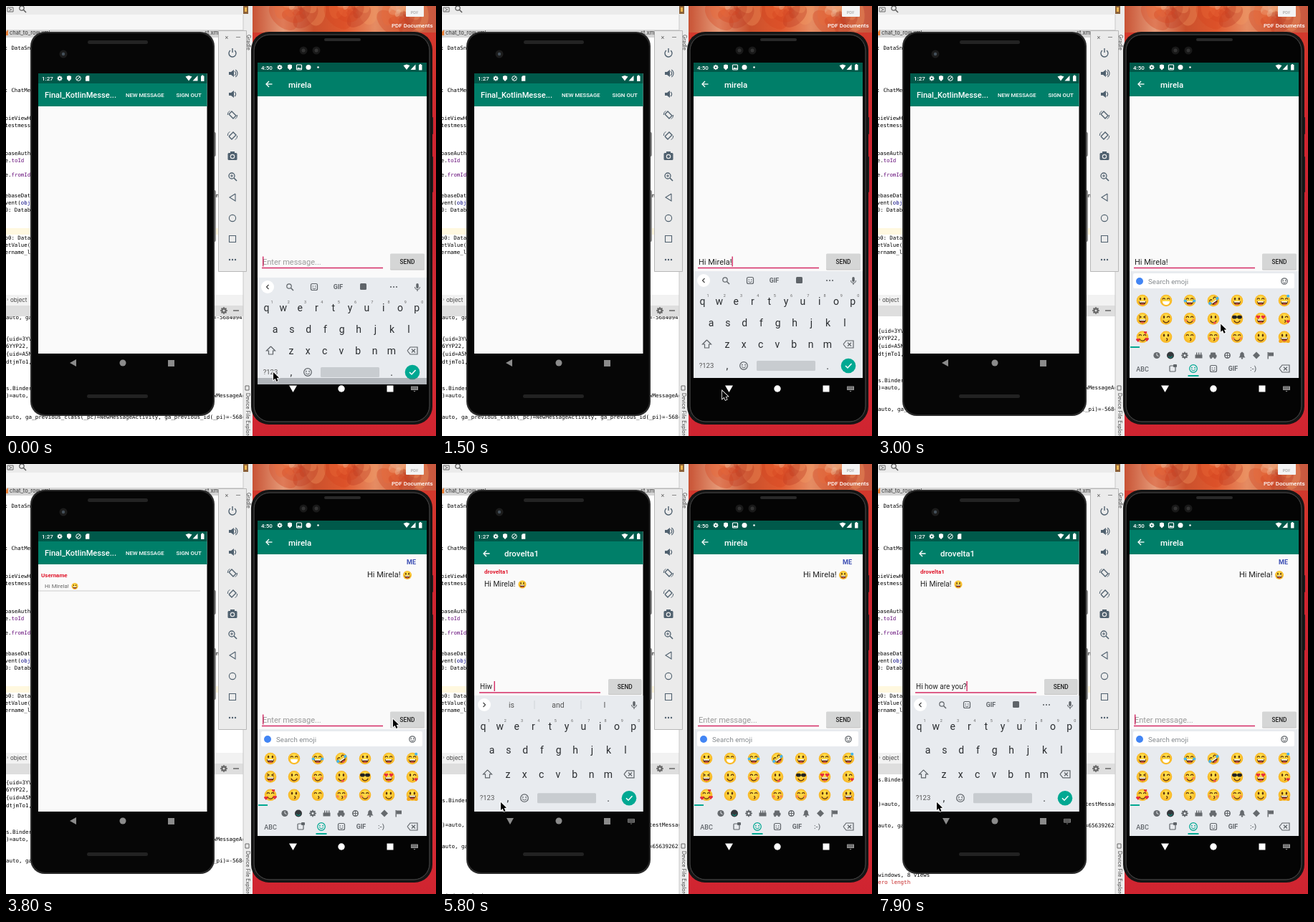
Write an HTML page with a canvas that moves like this. It is 600 px wide and 600 px high and loops after 8 s.

```html
<!DOCTYPE html>
<html lang="en">
<head>
<meta charset="utf-8">
<title>Messenger demo</title>
<style>
html, body { margin: 0; width: 100%; height: 100%; overflow: hidden; background: #fff; }
canvas { display: block; width: 600px; height: 600px; }
</style>
</head>
<body>
<canvas id="stage" width="600" height="600"></canvas>
<script>
const c = document.getElementById('stage').getContext('2d');
const LOOP = 8000, TAU = Math.PI * 2;
const SANS = 'Roboto, sans-serif', MONO = '"DejaVu Sans Mono", monospace';
const BAR = '#007f69', DARK = '#00594a', PINK = '#d32a63', TEAL = '#00a892';
const PAGE = '#fafafa', KEYS = '#e8ebef', ICON = '#5f6469', TOOL = '#50616f';
const PEER = 'mirela', ME = 'drovelta1', HELLO = 'Hi Mirela!';

// ---- drawing helpers ----
function box(x, y, w, h, fill, r = 0) {
  c.fillStyle = fill;
  c.beginPath();
  c.roundRect(x, y, w, h, r);
  c.fill();
}
function frame(x, y, w, h, color, lw = 1, r = 0) {
  c.strokeStyle = color;
  c.lineWidth = lw;
  c.beginPath();
  c.roundRect(x, y, w, h, r);
  c.stroke();
}
function dot(x, y, r, fill) {
  c.fillStyle = fill;
  c.beginPath();
  c.arc(x, y, r, 0, TAU);
  c.fill();
}
function ring(x, y, r, color, lw = 1, a = 0, b = TAU) {
  c.strokeStyle = color;
  c.lineWidth = lw;
  c.beginPath();
  c.arc(x, y, r, a, b);
  c.stroke();
}
function path(p, x = 0, y = 0) {
  c.beginPath();
  for (let i = 0; i < p.length; i += 2) c.lineTo(x + p[i], y + p[i + 1]);
}
function poly(p, fill, x, y) {
  path(p, x, y);
  c.fillStyle = fill;
  c.fill();
}
function line(p, color, lw = 1, x = 0, y = 0) {
  path(p, x, y);
  c.strokeStyle = color;
  c.lineWidth = lw;
  c.stroke();
}
function text(s, x, y, size, color, weight = 400, align = 'left', family = SANS) {
  c.font = `${weight} ${size}px ${family}`;
  c.fillStyle = color;
  c.textAlign = align;
  c.fillText(s, x, y);
}
function clipped(x, y, w, h, draw) {
  c.save();
  c.beginPath();
  c.rect(x, y, w, h);
  c.clip();
  draw();
  c.restore();
}
function code(s, x, y, color = '#000', size = 7.5) { text(s, x, y, size, color, 400, 'left', MONO); }
function heart(x, y, s, fill) {
  dot(x - s / 2, y - s / 4, s * .55, fill);
  dot(x + s / 2, y - s / 4, s * .55, fill);
  poly([-s, 0, s, 0, 0, s * 1.2], fill, x, y);
}

// ---- small icons ----
function gear(x, y, r, color) {
  ring(x, y, r * .65, color, r * .55);
  for (let i = 0; i < 8; i++) {
    const a = i * TAU / 8;
    dot(x + Math.cos(a) * r, y + Math.sin(a) * r, r * .25, color);
  }
}
function lens(x, y, color) {
  ring(x - 1, y - 1, 3.2, color, 1.2);
  line([1.5, 1.5, 5, 5], color, 1.4, x, y);
}
function smiley(x, y, r, color) {
  ring(x, y, r, color, 1.2);
  dot(x - r * .4, y - r * .25, .9, color);
  dot(x + r * .4, y - r * .25, .9, color);
  ring(x, y + .2, r * .5, color, 1, .2, Math.PI - .2);
}
function stickerIcon(x, y, color) {
  frame(x - 4.5, y - 4.5, 9, 9, color, 1.2, 2);
  dot(x - 1.7, y - 1, .8, color);
  dot(x + 1.7, y - 1, .8, color);
  ring(x, y + .6, 2.2, color, 1, .2, Math.PI - .2);
}
function mic(x, y) {
  box(x - 1.7, y - 5, 3.4, 7, ICON, 1.7);
  ring(x, y, 3.6, ICON, 1, 0, Math.PI);
  line([0, 3.5, 0, 6], ICON, 1.2, x, y);
}
function backspace(x, y) {
  line([-7, 0, -3, -5, 7, -5, 7, 5, -3, 5, -7, 0], ICON, 1.2, x, y);
  line([-1, -2.3, 4, 2.5], ICON, 1.2, x, y);
  line([4, -2.3, -1, 2.5], ICON, 1.2, x, y);
}
function shield(x, y) { poly([-3, -3, 0, -4, 3, -3, 3, 1, 0, 4, -3, 1], '#fff', x, y); }
function signals(x, y) {
  poly([-4.5, -2.5, 0, -4, 4.5, -2.5, 0, 3.5], '#fff', x, y);
  poly([5.5, 3.5, 12.5, -4, 12.5, 3.5], '#fff', x, y);
  box(x + 17, y - 3.5, 4.5, 7.5, '#fff', .5);
  box(x + 18.2, y - 4.5, 2, 1.5, '#fff');
}
function backArrow(x, y) {
  line([4.5, 0, -4, 0], '#fff', 1.3, x, y);
  line([0, -4, -4, 0, 0, 4], '#fff', 1.3, x, y);
}
function miniKeys(x, y, color) {
  box(x - 5, y - 3, 10, 5.5, color, .5);
  for (let i = 0; i < 8; i++) box(x - 3.7 + (i % 4) * 2, y - 2 + (i >> 2) * 2, 1, 1, '#000');
  poly([-1.5, 3.5, 1.5, 3.5, 0, 5], color, x, y);
}

// Face spec: eyes, mouth, extra
function face(x, y, r, spec) {
  const ink = '#5d320f', [eyes, mouth, extra] = spec;
  c.save();
  c.translate(x, y);
  c.scale(r / 8, r / 8);
  if (extra === 'r') c.rotate(-.6);
  const g = c.createRadialGradient(0, -3, 2, 0, 0, 8);
  g.addColorStop(0, '#ffe04a');
  g.addColorStop(1, '#f8b524');
  dot(0, 0, 8, g);
  for (const s of [-1, 1]) {
    if (eyes === 'h') heart(s * 3.4, -2.5, 2.5, '#e52a3d');
    else if (eyes === 's') box(s * 3.4 - 3.3, -4.5, 6.6, 4.5, '#222', 2);
    else if (eyes === '>') line([s * 4.5, -4, s * 1.8, -2.3, s * 4.5, -.8], ink, 1.2);
    else if (eyes === '^' || (eyes === 'w' && s > 0)) ring(s * 3, -1.4, 1.7, ink, 1.2, Math.PI, TAU);
    else {
      c.fillStyle = ink;
      c.beginPath();
      c.ellipse(s * 2.8, -2.3, 1.2, 1.9, 0, 0, TAU);
      c.fill();
    }
  }
  if (mouth === 'D' || mouth === 'g') {
    c.fillStyle = mouth === 'g' ? '#fff' : ink;
    c.beginPath();
    c.arc(0, 1, 4.9, 0, Math.PI);
    c.fill();
    if (mouth === 'D') {
      box(-4, 1, 8, 1.5, '#fff');
      box(-2.3, 4, 4.6, 1.6, '#ef5350', 1);
    }
  } else if (mouth === 'o') ring(.2, 3.3, 1.5, ink, 1.2, -1.6, 1.6);
  else ring(0, 1, 4.2, ink, 1.2, .3, Math.PI - .3);
  if (extra === 't' || extra === 'r') { dot(-6, .5, 2, '#45b5ec'); dot(6, .5, 2, '#45b5ec'); }
  if (extra === 'w') dot(5, -6, 2, '#45b5ec');
  if (extra === 'b') { dot(-5, 2, 1.8, '#f58a4d'); dot(5, 2, 1.8, '#f58a4d'); }
  if (extra === 'k') heart(5, 3.5, 2.2, '#e52a3d');
  if (extra === 'p') box(0, 4, 3.5, 3, '#ef5350', 1.5);
  if (extra === 'l') { heart(-6, 4, 2.4, '#e52a3d'); heart(6, 3, 2.4, '#e52a3d'); heart(4, -6, 2, '#e52a3d'); }
  if (extra === 'a') { dot(-5, 5.5, 2.5, '#f5a81c'); dot(5, 5.5, 2.5, '#f5a81c'); }
  c.restore();
}

// ---- desktop ----
const SOURCE = [
  [61, ': DataSn'], [120, ': ChatMe'], [159, 'pieViewH'], [169, 'testmess'], [208, 'baseAuth'],
  [218, 'e.'], [238, 'e.'], [267, 'ebaseDat'], [277, 'vent('], [287, '0: Datab'],
  [326, 'o0: Data'], [336, 'etValue('], [346, 'ername_l']
];
const PREV = 'auto, ga_previous_class(_pc)=';
const FIRST_LOG = PREV + 'LatestMessages, ga_previous_id(_pi)=-5684094';
const NEW_LOG = PREV + 'NewMessageActivity, ga_previous_id(_pi)=-5684094';
const OLD_LOG = PREV + 'LatestMessages, ga_previous_id(_pi)=6563926212';
const ORIGIN = ')=auto, ga_event_origin(_o)=auto, ga_active_screen_class(_sc)=';
const LOG = [
  [437, FIRST_LOG], [467, '{uid=3YV'], [477, '6YYP22,'], [488, '{uid=A5N'], [499, 'dtjmTo1,'],
  [536, 's.Binder'], [546, ORIGIN + 'NewMessageActivity'], [576, NEW_LOG],
  [664, 's.Binder'], [698, ORIGIN + 'LatestMessages'], [728, OLD_LOG],
  [797, 'windows, 8 views'], [807, 'ero length', '#c62828']
];
const SCROLL = [[0, 0], [1900, 11], [3700, 20], [4500, 137], [5300, 192], [6600, 221]];
const at = (keys, t) => keys.filter(k => k[0] <= t).pop()[1];

function shade(x0, y0, x1, y1, colors) {
  const g = c.createLinearGradient(x0, y0, x1, y1);
  colors.forEach((color, i) => g.addColorStop(i / (colors.length - 1), color));
  return g;
}

function wallpaper() {
  box(344, 0, 256, 600, shade(344, 30, 344, 600, ['#d33a2c', '#cf2530', '#c92431', '#d92f36', '#cf2430']));
  clipped(344, 0, 256, 37, () => {
    box(344, 0, 256, 37, shade(344, 0, 600, 0, ['#c85335', '#e59a78', '#c9502c', '#e0592f', '#e58c63', '#cf6a48', '#c8573e']));
    c.globalAlpha = .35;
    const tones = ['#f29a62', '#d4431f', '#f7c6a4', '#b93820', '#ea6a38'];
    for (const [x, y, size] of [[405, 2, 44], [480, 2, 42], [552, 12, 40]]) {
      for (let i = 0; i < 14; i++) {
        const a = i * 2.4, d = size * (1 - i / 16);
        c.fillStyle = tones[i % 5];
        c.beginPath();
        c.ellipse(x + Math.cos(a) * d * .6, y + Math.sin(a) * d * .45, d * .58, d * .34, a + 1.5, 0, TAU);
        c.fill();
      }
    }
    c.globalAlpha = 1;
  });
  box(558, -2, 25, 17, '#f3f3f3', 1);
  text('PDF', 570, 11, 6, '#999', 400, 'center');
  text('PDF Documents', 538, 30, 8, '#fff', 500);
}

function gutterLabel(s, x, y) {
  c.save();
  c.translate(x, y);
  c.rotate(Math.PI / 2);
  text(s, 0, 0, 7, '#444', 400, 'left', 'Inter, sans-serif');
  c.restore();
}

function desktop(t) {
  box(0, 0, 344, 600, '#fff');
  box(0, 0, 344, 12, '#ebebeb');
  frame(2, 2, 8, 6, '#666');
  line([4, 3.5, 8, 5, 4, 7], '#777', 1);
  lens(23, 4, '#555');
  box(0, 12, 344, 22, '#f7f7f7');
  box(0, 33, 331, 11, '#d6d6d6');
  text('chat_to_row.xml', 5, 40, 7.5, '#333', 400, 'left', 'Inter, sans-serif');
  text('st.xml', 277, 40, 7.5, '#333', 400, 'left', 'Inter, sans-serif');
  poly([0, 36, 3, 33, 3, 41, 0, 41], '#ea823a');
  box(0, 310, 331, 9, '#fff8df');
  for (const [y, s] of SOURCE) code(s, -1.5, y, '#000', 7.4);
  code('toId', 7.5, 218, '#660e7a', 7.4);
  code('fromId', 7.5, 238, '#660e7a', 7.4);
  code('obj', 20.8, 277, '#000080', 7.4);
  code('in', 288, 267);
  box(0, 403, 331, 15, '#f2f2f2');
  text('›', 1, 412, 8, '#777');
  text('object', 6, 413, 8, '#444', 400, 'left', 'Inter, sans-serif');
  box(0, 418, 331, 15, '#dedede');
  gear(304, 425, 4, '#666');
  line([317, 425, 325, 425], '#666', 1.5);
  clipped(0, 433, 331, 167, () => {
    for (const [y, s, color] of LOG) code(s, 0, y - at(SCROLL, t), color);
  });
  box(331, 12, 13, 588, '#ececec');
  line([331, 12, 331, 600], '#c8c8c8', 1);
  box(331, 0, 7, 11, '#8b6138');
  box(333, 2, 3, 6, '#f0b74f');
  gutterLabel('Device File Explorer', 335, 540);
  gutterLabel('Gradle', 336, 40);
  frame(334, 530, 5, 6, '#666', 1);
  wallpaper();
}

function tools() {
  box(296, 34, 40, 337, '#ebebeb');
  frame(296.5, 34.5, 39, 336, '#b7b7b7');
  const x = 316;
  text('×', 308, 47, 9, '#666', 400, 'center');
  line([321, 43.5, 327, 43.5], '#888');
  ring(x, 66, 5, TOOL, 1.4, -.9, Math.PI + .9);
  line([x, 59, x, 65], TOOL, 1.4);
  for (const y of [94, 123]) {
    poly([-5, -2, -2, -2, 2, -5, 2, 5, -2, 2, -5, 2], TOOL, x, y);
    ring(x + 1, y, 3.6, TOOL, 1.2, -1, 1);
  }
  ring(x + 1, 94, 6, TOOL, 1.2, -1, 1);
  for (const [y, s] of [[152, 1], [181, -1]]) {
    line([-5, -s, -1, -5 * s, 5, s, 1, 5 * s, -5, -s], TOOL, 1.4, x, y);
    ring(x, y, 6.8, TOOL, 1, 0, 1);
    ring(x, y, 6.8, TOOL, 1, Math.PI, Math.PI + 1);
  }
  box(x - 6.5, 205, 13, 10, TOOL, 1.5);
  box(x - 3, 203, 6, 4, TOOL);
  ring(x, 210, 2.7, '#ebebeb', 1.2);
  ring(x - 1, 237, 4, TOOL, 1.3);
  line([x + 2, 240, x + 6, 244], TOOL, 1.6);
  line([x - 3, 237, x + 1, 237], TOOL, 1);
  line([x - 1, 235, x - 1, 239], TOOL, 1);
  line([4, -5, -4, 0, 4, 5, 4, -5], TOOL, 1.1, x, 267);
  ring(x, 296, 4.6, TOOL, 1.1);
  frame(x - 4.5, 320.5, 9, 9, TOOL, 1.1);
  for (const d of [-4, 0, 4]) dot(x + d, 354, 1.2, TOOL);
}

// ---- shared phone parts ----
function topBars(x, y, time, appY, appH) {
  box(x, y, 236, appY - y, DARK);
  box(x, appY, 236, appH, BAR);
  text(time, x + 5, y + 10, 8, '#fff', 500);
}
function sendButton(x, y, w, h) {
  box(x, y + 1, w, h, '#c4c4c4', 1.5);
  box(x, y, w, h, '#d5d6d6', 1.5);
  text('SEND', x + w / 2, y + h / 2 + 3, 8.3, '#222', 500, 'center');
}
function field(x, y, size, s, cursor, color, emoji) {
  line([x - 1, y + 5, x + 168, y + 5], color, color === PINK ? 1.4 : 1);
  text(s || 'Enter message...', x, y, size, s ? '#222' : '#9a9a9a');
  let end = s ? c.measureText(s).width : 0;
  if (emoji) {
    face(x + end + 9, y - 4, 5.5, 'oD');
    end += 16;
  }
  if (cursor) box(x + end, y - 11, 1.4, 14, PINK);
}

function strip(x, y, words) {
  dot(x + 14, y, 9, '#fff');
  const d = words ? 1 : -1;
  line([-1.5 * d, -3, 1.5 * d, 0, -1.5 * d, 3], '#444', 1.2, x + 14, y);
  mic(x + 223, y);
  if (words) {
    ['is', 'and', 'I'].forEach((w, i) => text(w, x + 52 + i * 65, y + 4, 10.5, '#555', 400, 'center'));
    for (const d of [84, 149]) line([x + d, y - 6, x + d, y + 6], '#cfd3d8', 1);
    return;
  }
  lens(x + 45, y, ICON);
  stickerIcon(x + 79, y, ICON);
  text('GIF', x + 112.5, y + 3, 8.8, ICON, 700, 'center');
  box(x + 143, y - 5, 9, 9, ICON, 1.5);
  for (const d of [-4, 0, 4]) dot(x + 190 + d, y, 1.1, ICON);
}

// Keyboard with its top left corner, strip centre, first row centre and row pitch
function keyboard(x, top, bottom, stripY, rowY, pitch, words) {
  box(x, top, 236, bottom - top, KEYS);
  strip(x, stripY, words);
  const key = (s, kx, r) => text(s, x + kx, rowY + r * pitch + 5, 14, '#2b2e31', 400, 'center');
  [...'qwertyuiop'].forEach((s, i) => {
    key(s, 12.5 + i * 23.3, 0);
    text((i + 1) % 10, x + 20 + i * 23.3, rowY - 6, 5.5, '#666', 400, 'center');
  });
  [...'asdfghjkl'].forEach((s, i) => key(s, 24.5 + i * 23.3, 1));
  [...'zxcvbnm'].forEach((s, i) => key(s, 47 + i * 23.3, 2));
  const y2 = rowY + 2 * pitch, y3 = rowY + 3 * pitch;
  line([0, -6, 6, 0, 3, 0, 3, 5, -3, 5, -3, 0, -6, 0, 0, -6], ICON, 1.2, x + 18.5, y2);
  backspace(x + 216, y2);
  text('?123', x + 18, y3 + 3, 9.5, '#555', 400, 'center');
  key(',', 47, 3);
  smiley(x + 70, y3, 5.3, ICON);
  box(x + 88, y3 - 7, 82, 14, '#c8ccd0', 1.5);
  key('.', 187, 3);
  dot(x + 216, y3, 10.3, TEAL);
  line([-4, 0, -1, 3, 4.5, -3], '#fff', 1.5, x + 216, y3);
}

// ---- left phone ----
const LEFT_TYPING = [
  [0, ''], [5500, 'H'], [5600, 'Hi'], [5700, 'Hiw'], [5800, 'Hiw '], [6000, 'Hiw'], [6100, 'Hi']
];
function leftText(t) {
  if (t < 6200) return at(LEFT_TYPING, t);
  return 'Hi how are you?'.slice(0, 3 + Math.floor((t - 6200) / 105));
}

function leftScreen(t) {
  const chat = t >= 4600, typing = t >= 5300;
  box(45, 94, 236, 391, PAGE);
  topBars(45, 94, '1:27', 108, 32);
  gear(75, 101, 3, '#fff');
  shield(88, 101);
  ring(101, 101, 3.3, '#fff', 1);
  line([99, 103, 103, 99], '#fff', 1);
  poly([-2.5, -2, -.8, -3.7, 2.8, -3.7, 2.8, 3.7, -2.5, 3.7], '#fff', 113.5, 101);
  signals(255, 101);
  if (chat) {
    backArrow(62, 125);
    text(ME, 87, 129, 11.5, '#fff', 500);
    if (t >= 4900) {
      text(ME, 59, 153, 8, '#e0182d', 700);
      text(HELLO, 59, 171, 10.3, '#222');
      face(112, 168, 5.5, 'oD');
    }
    const s = leftText(t);
    const blink = t >= 5500 || (t + 250) % 800 < 400;
    field(53, typing ? 314 : 475, 10, s, typing && blink, typing ? PINK : '#999');
    sendButton(232, typing ? 300 : 460, 46.5, 21);
    if (typing) keyboard(45, 323, 485, 336, 366, 33.4, s && !s.endsWith('?'));
    return;
  }
  text('Final_KotlinMesse...', 54, 128, 11.1, '#fff', 500);
  text('NEW MESSAGE', 167, 127, 7.7, '#fff', 500);
  text('SIGN OUT', 237.5, 127, 7.9, '#fff', 500);
  if (t >= 3700) {
    text('Username', 49, 158, 8, '#e0182d', 700);
    text(HELLO, 54, 173, 8, '#666');
    face(96, 170.5, 4.5, 'oD');
    line([45, 177, 271, 177], '#ccc', 1);
  }
}

function leftPhone(t) {
  box(288, 176, 5, 34, '#8a8a8a', 2);
  box(288, 257, 5, 72, '#8a8a8a', 2);
  box(34, 36, 257, 536, '#2b2b2b', 20);
  box(36, 38, 253, 532, '#060606', 19);
  box(114, 48, 84, 5, '#232323', 2.5);
  box(113, 542, 85, 5, '#222', 2.5);
  dot(80, 67, 5.5, '#1c1c1c');
  dot(80, 67, 2.2, '#45505a');
  clipped(45, 94, 235.5, 391, () => leftScreen(t));
  const gray = '#8b8b8b';
  if (t >= 5300) {
    poly([-5, -4, 5, -4, 0, 5], gray, 95, 498);
    miniKeys(264, 498, '#777');
  } else poly([4, -5, 4, 5, -5, 0], gray, 94, 498);
  dot(163, 498, 4.5, gray);
  box(226, 494, 9, 9, gray);
}

// ---- right phone ----
const FACES = [
  'oD ^g ^Dt ^Dr oD ^D ^Dw', '>D w) ^)b o)p s) hD wok', '^)l oo ^o ^ob ^)b o) oDa'
].map(r => r.split(' '));

function panelBase(hint, active) {
  box(351, 370, 236, 149, KEYS);
  box(356, 373, 225, 21, '#fff', 2);
  dot(365, 384, 5, '#4285f4');
  text(hint, 377, 387.5, 9.7, '#858a8e');
  text('ABC', 369, 509.5, 9, ICON, 500, 'center');
  frame(407, 502, 8, 8, ICON, 1.2, 1);
  box(412, 500, 5, 4, ICON, 1);
  smiley(440, 506, 5.3, active === 440 ? TEAL : ICON);
  stickerIcon(468, 506, active === 468 ? TEAL : ICON);
  box(active - 7.5, 515, 15, 2, TEAL);
  text('GIF', 495.5, 509, 8.8, ICON, 700, 'center');
  text(':-)', 523.5, 509, 9.5, ICON, 500, 'center');
  backspace(567, 506);
}

function sloth(x, y, s) {
  c.save();
  c.translate(x, y);
  c.scale(s, s);
  dot(0, 0, 10, '#5d3a23');
  c.fillStyle = '#e5bc8a';
  c.beginPath();
  c.ellipse(0, 1, 7.5, 5.5, 0, 0, TAU);
  c.fill();
  dot(-4, 0, 2, '#5d3a23');
  dot(4, 0, 2, '#5d3a23');
  dot(0, 2, 1.3, '#222');
  c.restore();
}

function couchSticker() {
  box(355, 401, 66, 66, '#fff');
  text("IT'S", 370, 415, 8, '#111', 700, 'center');
  text('5', 383.5, 417, 15, '#111', 900, 'center');
  text("O'CLOCK", 388.5, 414, 6.6, '#111', 700);
  text('SOMEWHERE', 388.5, 424, 7.2, '#111', 700, 'center');
  for (const x of [362, 414]) line([x, 455, x, 463], '#222', 2);
  for (const [x, y, w, h, fill] of [[361, 429, 27, 20, '#2b9fb4'], [388, 429, 27, 20, '#2b9fb4'],
    [358, 446, 60, 12, '#37b4c5'], [356, 437, 8, 20, '#37b4c5'], [412, 437, 8, 20, '#37b4c5']]) {
    box(x, y, w, h, fill, 3);
    frame(x, y, w, h, '#1d4c57', .8, 3);
  }
  c.lineCap = c.lineJoin = 'round';
  line([366, 434, 375, 446, 394, 448, 413, 436], '#8a5128', 6);
  line([376, 449, 386, 453, 400, 450], '#a4673a', 9);
  line([378, 452, 369, 462], '#8a5128', 4);
  line([400, 451, 406, 462], '#8a5128', 4);
  c.lineCap = 'butt';
  c.lineJoin = 'miter';
  sloth(397, 438, .65);
}

function stickerPanel() {
  panelBase('Search stickers', 468);
  box(351, 395, 236, 76, '#dce1e5');
  couchSticker();
  box(351, 471, 236, 27, '#eef0f2');
  box(355, 474, 23, 22, '#fff');
  frame(355.7, 474.7, 21.6, 21, TEAL, 1.4);
  ring(366.5, 485, 5, ICON, 1.2);
  line([366.5, 482, 366.5, 485.5, 369, 487], ICON, 1);
  for (let i = 0; i < 7; i++) box(380 + i * 24.4, 474, 22, 22, '#fff');
  sloth(390.5, 485, .95);
  heart(415, 484, 8, '#e62c69');
  line([409, 482, 421, 488], '#222', 1.5);
  heart(438, 480, 4.5, '#e62c50');
  box(436, 483, 8, 12, '#f2ae75', 3);
  poly([-9, 3, -4, -3, 0, -9, 3, -3, 9, -6, 4, 3, 5, 9, -3, 5], '#f4c52d', 464, 485);
  heart(459, 490, 3, '#e83e65');
  line([479, 494, 489, 482], '#45a35c', 2);
  heart(491, 480, 4.5, '#f17b96');
  dot(483, 486, 3.5, '#f3b746');
  dot(508, 481, 4.5, '#f4c52d');
  dot(517, 481, 3, '#28a8c2');
  ring(512, 485, 7, '#e0413f', 2.5, .2, Math.PI - .2);
  box(528, 476, 17, 17, '#1aa897', 3);
  box(531, 479, 11, 9, '#fff', 3);
  face(537, 484, 4, 'o)');
  box(558, 474, 24, 22, TEAL, 1);
  line([570, 480.5, 570, 490.5], '#fff', 1.4);
  line([565, 485.5, 575, 485.5], '#fff', 1.4);
}

function emojiPanel() {
  panelBase('Search emoji', 440);
  smiley(567, 384, 4.2, ICON);
  FACES.forEach((row, j) => row.forEach((f, i) => face(369 + i * 33, 411 + j * 25.4, 8.3, f)));
  box(352, 475, 13, 2, TEAL);
  const y = 487.5, col = '#666a6e';
  dot(389, y, 4.6, col);
  line([389, y - 3, 389, y, 391.5, y + 1], KEYS, 1);
  dot(408, y, 5, '#34383c');
  ring(408, y + .5, 2.5, TEAL, 1, .2, Math.PI - .2);
  gear(428, y, 4, col);
  box(442.5, y - 1, 10, 5, col);
  for (const d of [-3, 0, 3]) box(447 + d, y - 4, 1.4, 4, col);
  box(462.5, y - 1, 10, 4, col, 1);
  box(464, y - 4, 7, 4, col, 1);
  dot(464.7, y + 3.4, 1.4, col);
  dot(470, y + 3.4, 1.4, col);
  ring(487.5, y, 3.7, col, 1.6);
  line([484, y, 491, y], col, 1);
  line([487.5, y - 4, 487.5, y + 4], col, 1);
  poly([-4.5, 3, -3, 1, -2.5, -3, 0, -5, 2.5, -3, 3, 1, 4.5, 3], col, 508, y);
  dot(508, y + 4, 1.2, col);
  poly([-5, 0, 0, -5, 5, 0, 0, 5], col, 528, y);
  box(543.5, y - 4.5, 1.4, 9.5, col);
  box(545, y - 4, 7, 5, col);
}

function rightPhone(t) {
  const typed = Math.min(HELLO.length, Math.max(0, Math.floor((t - 250) / 110) + 1));
  const sent = t >= 3600;
  box(592, 155, 4, 24, '#222', 1);
  box(592, 210, 4, 50, '#222', 1);
  box(342, 36, 253, 548, '#151515', 25);
  frame(346, 40, 245, 540, '#484848', 1, 22);
  box(347, 41, 243, 538, '#040404', 21);
  for (const x of [415, 433]) {
    dot(x, 62, 5.5, '#191919');
    dot(x, 62, 2.5, '#343434');
  }
  box(444, 45, 51, 4, '#292929', 2);
  box(351, 79, 236, 440, PAGE);
  topBars(351, 79, '4:50', 92, 34);
  gear(382, 85.5, 3, '#fff');
  shield(396, 85.5);
  frame(405.5, 82, 7, 7, '#fff', 1.2, 1);
  poly([-3, 2.5, -1, 0, 1, 1.5, 2, .5, 3, 2.5], '#fff', 409, 85.5);
  dot(422, 85.5, 3.5, '#fff');
  dot(435.5, 85.5, 1.3, '#fff');
  signals(559, 85.5);
  backArrow(367, 109);
  text(PEER, 394, 113.5, 11.5, '#fff', 500);
  if (sent) {
    text('ME', 572, 139.5, 9, '#3f51b5', 700, 'right');
    text(HELLO, 504, 158, 11, '#222');
    face(560, 155, 6, 'oD');
  }
  const busy = typed > 0 && t < 1600;
  const cursor = busy || ((t < 1900 || sent) && (t + 250) % 800 < 400);
  field(358, 360.5, 11, sent ? '' : HELLO.slice(0, typed), cursor, PINK, t >= 3200 && !sent);
  sendButton(536, 345.5, 48, 22);
  if (t < 1900) {
    const d = t < 100 ? 9 : 0;
    clipped(351, 370, 236, 149 + d, () => keyboard(351, 370 + d, 519 + d, 383 + d, 412 + d, 30, false));
    if (d) box(351, 519, 236, 9, 'rgba(110,115,120,.45)');
  } else if (t < 2800) stickerPanel();
  else emojiPanel();
  poly([-5.5, -4.5, 5.5, -4.5, 0, 5], '#fff', 400.5, 534);
  dot(468, 534, 4.7, '#fff');
  box(531.5, 529.5, 9, 9, '#fff');
  miniKeys(570, 533.5, '#999');
}

// ---- pointer: time, x, y ----
const MOVES = [
  [0, 373, 511], [200, 373, 511], [600, 391, 537], [1550, 391, 537], [1800, 421, 502], [1950, 421, 502],
  [2250, 422, 446], [2400, 422, 446], [2700, 440, 506], [2850, 440, 506], [3100, 499, 410],
  [3250, 499, 410], [3500, 540, 356], [3850, 540, 356], [4400, 73, 156], [4850, 73, 156],
  [5200, 82, 472], [8000, 82, 472]
];
function pointer(t) {
  const i = MOVES.findIndex(m => m[0] > t);
  const [t0, x0, y0] = MOVES[i - 1], [t1, x1, y1] = MOVES[i];
  const u = (t - t0) / (t1 - t0), k = u * u * (3 - 2 * u);
  path([0, 0, 0, 11, 2.6, 8.8, 4.5, 13, 6.5, 12, 4.7, 8, 8, 7.7], x0 + (x1 - x0) * k, y0 + (y1 - y0) * k);
  c.closePath();
  c.strokeStyle = '#fff';
  c.lineWidth = 1.6;
  c.stroke();
  c.fillStyle = '#000';
  c.fill();
}

const start = performance.now();
function draw() {
  const t = Math.floor(((performance.now() - start) % LOOP) / 100) * 100;
  desktop(t);
  leftPhone(t);
  tools();
  rightPhone(t);
  pointer(t);
  requestAnimationFrame(draw);
}
draw();
</script>
</body>
</html>
```
